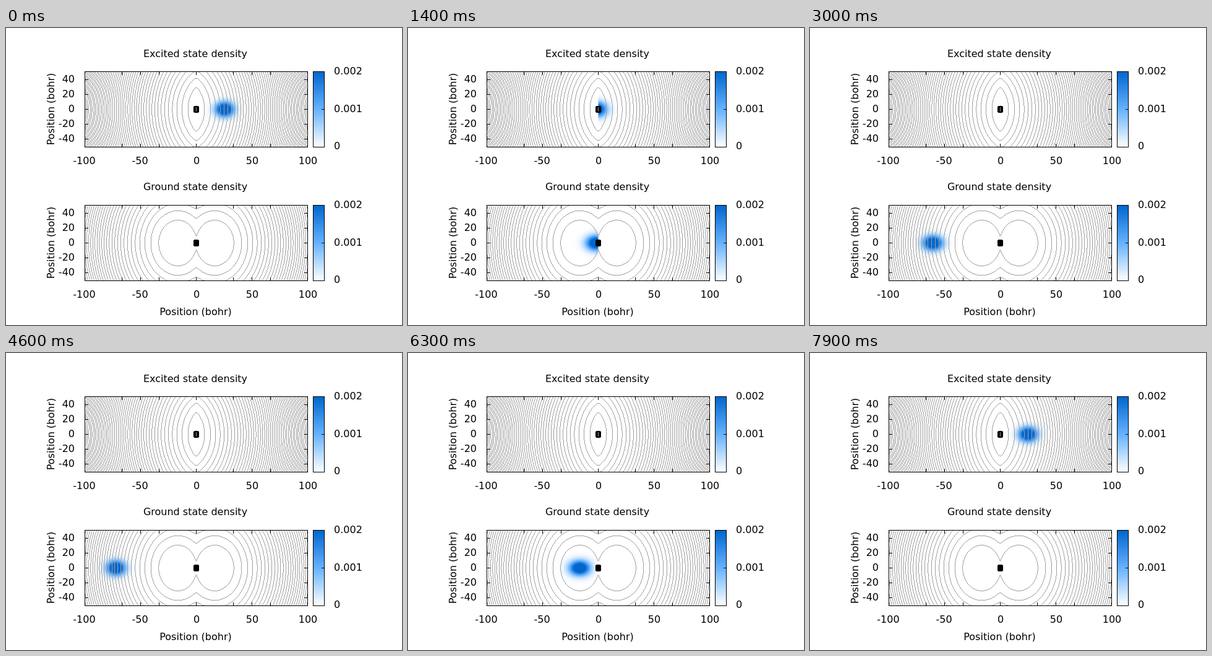
Animation, 640 px wide and 480 px high, one loop 8000 ms. Source, as an HTML page with a canvas:

```html
<!DOCTYPE html>
<html lang="en">
<head>
<meta charset="utf-8">
<title>State densities</title>
<style>
  html, body { margin: 0; width: 100%; height: 100%; overflow: hidden; background: #fff; }
  canvas { display: block; }
</style>
</head>
<body>
<canvas width="640" height="480"></canvas>
<script>
const ctx = document.querySelector('canvas').getContext('2d');
const LEFT = 127, WIDTH = 360, HEIGHT = 122, CENTER_X = 307;
const LOOP = 8000, STEP = 100, PERIOD = 8100;
const SHIFT = 30, COUPLING = 4.2, SPACING = 942, LINE = 160;
const PALETTE = [[255, 255, 255], [102, 178, 255], [0, 102, 204]];

const panels = [
  { title: 'Excited state density', top: 70, sign: 1 },
  { title: 'Ground state density', top: 286, sign: -1 }
];

function color(value) {
  const v = Math.min(value, 1) * 2, i = v < 1 ? 0 : 1;
  return PALETTE[i].map((c, k) => c + (PALETTE[i + 1][k] - c) * (v - i));
}

const gap = (x, y) => Math.hypot(2 * SHIFT * x, COUPLING * y);

// Adiabatic energy in units of the contour spacing
function energy(x, y, sign) {
  y /= 1.2;
  return (x * x + y * y + SHIFT * SHIFT + sign * gap(x, y)) / SPACING;
}

function onContour(x, y, sign) {
  const l = energy(x - .5, y, sign), r = energy(x + .5, y, sign);
  const u = energy(x, y - .5, sign), d = energy(x, y + .5, sign);
  return Math.abs(r - l) > Math.abs(d - u)
    ? Math.floor(l) !== Math.floor(r)
    : Math.floor(u) !== Math.floor(d);
}

function eachPixel(visit) {
  for (let j = 0; j <= HEIGHT; j++)
    for (let i = 0; i <= WIDTH; i++)
      visit(i - WIDTH / 2, j - HEIGHT / 2, j * (WIDTH + 1) + i);
}

function text(string, x, y, align = 'center', angle = 0) {
  ctx.save();
  ctx.translate(x, y);
  ctx.rotate(angle);
  ctx.textAlign = align;
  ctx.fillText(string, 0, 0);
  ctx.restore();
}

function setup(panel) {
  const { top, sign } = panel, middle = top + HEIGHT / 2;
  panel.image = ctx.createImageData(WIDTH + 1, HEIGHT + 1);
  panel.lines = [];
  eachPixel((x, y, i) => panel.lines[i] = onContour(x, y, sign));

  ctx.fillStyle = '#000';
  ctx.font = '16px "DejaVu Sans", sans-serif';
  text(panel.title, 306, top - (sign > 0 ? 23 : 24));
  text('Position (bohr)', 78, middle, 'center', -Math.PI / 2);
  for (let v = -100; v <= 100; v += 50) text(v, CENTER_X + (v < 0 ? -.5 : 1) + v * 1.8, top + 150);
  for (let v = -40; v <= 40; v += 20) text(v, 111, middle + 5 - v * 1.2, 'right');
  ['0.002', '0.001', '0'].forEach((s, i) => text(s, 530, top + 5 + i * 60.5, 'left'));

  for (let j = 0; j <= HEIGHT; j++) {
    ctx.fillStyle = `rgb(${color(1 - j / HEIGHT)})`;
    ctx.fillRect(496, top + j, 18, 1);
  }
  ctx.strokeRect(496.5, top + .5, 18, HEIGHT);
  ctx.fillStyle = '#000';
  ctx.fillRect(510, middle, 4, 1);
}

function drawAxes({ top, sign }) {
  const middle = top + HEIGHT / 2;
  ctx.strokeRect(LEFT + .5, top + .5, WIDTH, HEIGHT);
  ctx.fillStyle = '#000';
  for (const x of [187, 217, 247, 307, 367, 397, 427]) {
    ctx.fillRect(x, top, 1, 6);
    ctx.fillRect(x, top + HEIGHT - 5, 1, 6);
  }
  for (let k = -2; k <= 2; k++) {
    ctx.fillRect(LEFT, middle + k * 24, 6, 1);
    ctx.fillRect(LEFT + WIDTH - 5, middle + k * 24, 6, 1);
  }
  ctx.fillRect(CENTER_X - 4, middle - 4, 9, 9);
  ctx.fillRect(CENTER_X - 3, middle - 5, 7, 11);
  if (sign > 0) {
    ctx.fillStyle = `rgb(${LINE},${LINE},${LINE})`;
    ctx.fillRect(CENTER_X, middle - 3, 1, 7);
  }
}

function drawPanel(panel, center, sigmaX) {
  const data = panel.image.data, sigmaY = 8.2;
  eachPixel((x, y, i) => {
    let rgb = [LINE, LINE, LINE];
    if (!panel.lines[i]) {
      const share = (1 + panel.sign * 2 * SHIFT * x / (gap(x, y / 1.2) || 1)) / 2;
      const r2 = ((x - center) / sigmaX) ** 2 + (y / sigmaY) ** 2;
      rgb = color(1.45 * Math.exp(-r2 / 2) * share);
    }
    data.set([...rgb, 255], i * 4);
  });
  ctx.putImageData(panel.image, LEFT, panel.top);
  drawAxes(panel);
}

let shown = -1;
function frame(now) {
  const t = Math.floor(now % LOOP / STEP) * STEP;
  if (t !== shown) {
    shown = t;
    const phase = Math.cos(2 * Math.PI * t / PERIOD);
    for (const panel of panels) drawPanel(panel, -46 + 92 * phase, 11.3 - phase * phase);
  }
  requestAnimationFrame(frame);
}

panels.forEach(setup);
text('Position (bohr)', 306.5, 464);
frame(performance.now());
</script>
</body>
</html>
```
